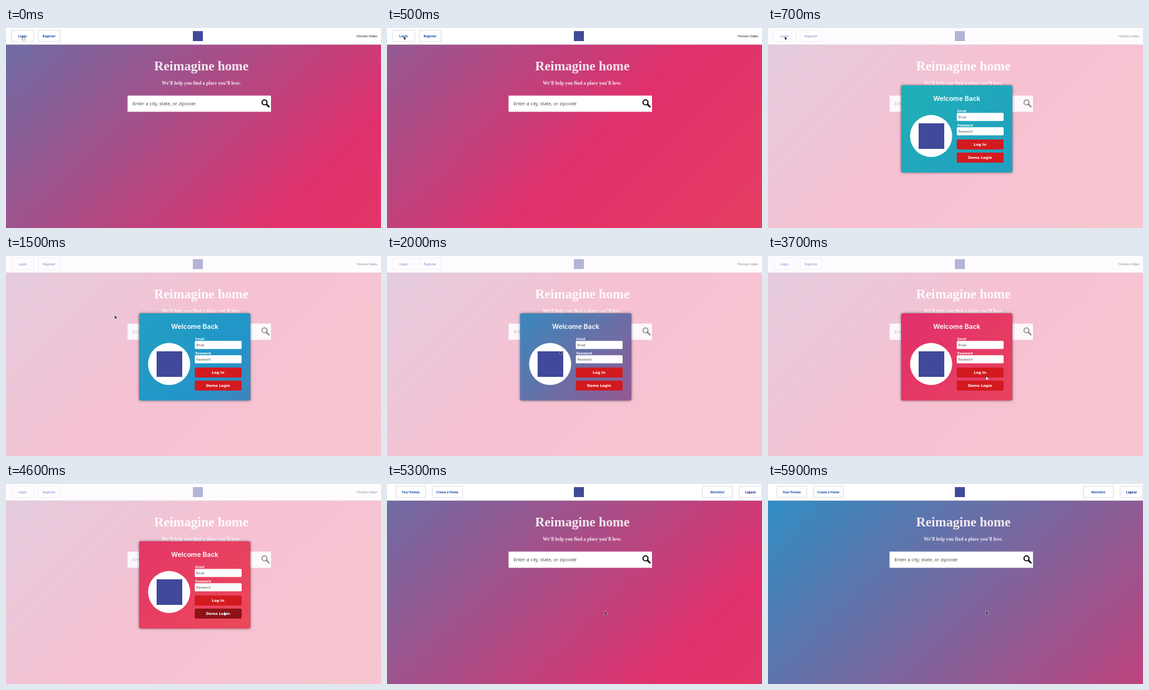
An HTML page with a canvas for the animation above (6000 ms loop, 600 px wide and 321 px high).

```html
<!DOCTYPE html>
<html lang="en">
<head>
<meta charset="utf-8">
<title>Home search</title>
<style>
html, body { margin: 0; width: 100%; height: 100%; overflow: hidden; background: #fff; }
canvas { display: block; width: 600px; height: 321px; }
</style>
</head>
<body>
<canvas id="stage"></canvas>
<script>
const W = 600, H = 321, LOOP = 6000, STEP = 100;
const OPEN = 700, HOVER = 3900, CLOSE = 5300;
const SANS = '"Open Sans", sans-serif';
const SERIF = '"Liberation Serif", serif';
const WIDE = '"DejaVu Sans", sans-serif';
const COLORS = ['#f0584f', '#e1306c', '#2394c9', '#1fb8b0'];
const LOGO = '#40499a';
const ARROW = new Path2D('M0 0V4.6L1.1 3.6L1.9 5.2L2.6 4.9L1.9 3.3H3.3Z');
const HAND = new Path2D('M0 0H.9L1.1 2L3.6 2.6V4L2.9 5.4H.4L-1.3 3.2L-.9 2.7L0 3.2Z');

const canvas = document.getElementById('stage');
const dpr = window.devicePixelRatio || 1;
canvas.width = W * dpr;
canvas.height = H * dpr;
const ctx = canvas.getContext('2d');
ctx.scale(dpr, dpr);

const clamp = x => Math.min(1, Math.max(0, x));
const mix = (a, b, f) => a + (b - a) * f;
const progress = (t, from, to) => clamp((t - from) / (to - from));

// CSS "ease": cubic-bezier(.25, .1, .25, 1), solved by bisection
function ease(x) {
  let lo = 0, hi = 1;
  for (let i = 0; i < 20; i++) {
    const u = (lo + hi) / 2, v = 1 - u;
    if (.75 * v * u + u ** 3 < x) lo = u; else hi = u;
  }
  const v = 1 - lo;
  return .3 * v * v * lo + 3 * v * lo * lo + lo ** 3;
}

function text(str, x, y, size, color, { font = SANS, weight = 400, align = 'left', alpha = 1 } = {}) {
  ctx.font = `${weight} ${size}px ${font}`;
  ctx.textAlign = align;
  ctx.fillStyle = color;
  ctx.globalAlpha = alpha;
  ctx.fillText(str, x, y);
  ctx.globalAlpha = 1;
}

function box(x, y, w, h, r, fill) {
  ctx.beginPath();
  ctx.roundRect(x, y, w, h, r);
  ctx.fillStyle = fill;
  ctx.fill();
}

// Diagonal window onto the four-colour blend, centred on position mid
function diagonal(x, y, w, h, mid, half) {
  const len = (w + h) / (4 * half), cx = x + w / 2, cy = y + h / 2;
  const a = mid * len, b = (mid - 1) * len;
  const g = ctx.createLinearGradient(cx + a, cy + a, cx + b, cy + b);
  COLORS.forEach((c, i) => g.addColorStop(i / 3, c));
  return g;
}

function navButton(label, x, w, size, dim, color = '#184bb0') {
  ctx.globalAlpha = dim ? .4 : 1;
  ctx.strokeStyle = '#dcdee8';
  ctx.lineWidth = 1;
  ctx.strokeRect(x + .5, 3.5, w, 18);
  text(label, x + w / 2 + .5, 14.5, size, color, { weight: 700, align: 'center', alpha: dim ? .42 : 1 });
}

function nav(dim, member) {
  ctx.fillStyle = dim ? '#fefcfe' : '#fff';
  ctx.fillRect(0, 0, W, 26);
  ctx.fillStyle = dim ? '#eee8ee' : '#cfcbd6';
  ctx.fillRect(0, 26, W, 1);
  if (member) {
    navButton('Your Homes', 13.5, 48, 4.8, dim);
    navButton('Create a Home', 72, 48, 4.8, dim);
    navButton('Watchlist', 504, 48, 4.8, dim);
    navButton('Logout', 563, 36, 5, dim, '#0b2a8c');
  } else {
    navButton('Login', 8, 36, 5.2, dim);
    navButton('Register', 51, 35, 5.1, dim);
    text('Homes Index', 594, 14.5, 5.4, '#111', { align: 'right', alpha: dim ? .5 : 1 });
  }
  ctx.globalAlpha = dim ? .4 : 1;
  box(299, 5, 16, 16, 0, LOGO);
  ctx.globalAlpha = 1;
}

function lens(alpha) {
  ctx.globalAlpha = alpha;
  ctx.strokeStyle = '#000';
  ctx.lineWidth = 1.8;
  ctx.lineCap = 'round';
  ctx.beginPath();
  ctx.arc(413.6, 119.4, 4, 0, 7);
  ctx.stroke();
  ctx.lineWidth = 2.6;
  ctx.beginPath();
  ctx.moveTo(417.2, 123);
  ctx.lineTo(420.6, 126.4);
  ctx.stroke();
  ctx.globalAlpha = 1;
}

// The page blend slides towards red, rests behind the dialog, then slides back
function pageMid(t) {
  return t < CLOSE
    ? mix(.41, .32, progress(t, 0, OPEN))
    : mix(.41, .52, progress(t, CLOSE, 5900));
}

function page(t, dim) {
  ctx.fillStyle = diagonal(0, 26, W, 295, pageMid(t), .125);
  ctx.fillRect(0, 0, W, H);
  if (dim) {
    ctx.fillStyle = 'rgba(255,255,255,.7)';
    ctx.fillRect(0, 0, W, H);
  }
  nav(dim, t >= CLOSE);
  const ink = dim ? '#fefafd' : '#f1e9f0';
  const heading = { font: SERIF, weight: 700, align: 'center' };
  text('Reimagine home', 312.5, 68, 21.2, ink, heading);
  text('We’ll help you find a place you’ll love.', 312.5, 91, 7.78, ink, heading);
  box(194.5, 108.5, 229.5, 26, 0, dim ? '#fdf8fb' : '#fff');
  text('Enter a city, state, or zipcode', 202.5, 124.2, 7.6, '#444', { alpha: dim ? .35 : 1 });
  lens(dim ? .4 : 1);
}

function field(label, y) {
  text(label, 303, y, 5.2, '#fff', { weight: 700 });
  box(302, y + 1.5, 75, 13, 1.5, '#fff');
  text(label, 304.5, y + 10, 5, '#444');
}

function button(label, y, fill) {
  box(302, y, 75, 16, 2, fill);
  text(label, 339.3, y + 10.2, 5.75, '#fff', { font: WIDE, weight: 700, align: 'center' });
}

function modal(t) {
  const mid = mix(.85, .18, ease(progress(t, 600, 5800)));
  ctx.save();
  ctx.shadowColor = 'rgba(0,0,0,.5)';
  ctx.shadowBlur = 4 * dpr;
  box(213, 92, 178, 140, 3, diagonal(213, 92, 178, 140, mid, .08));
  ctx.restore();
  text('Welcome Back', 302, 116.5, 10.6, '#fff', { font: 'Inter, sans-serif', weight: 600, align: 'center' });
  box(227.3, 139.6, 67.4, 67.4, 33.7, '#fff');
  box(241, 153, 41, 41, 0, LOGO);
  field('Email', 134.7);
  field('Password', 157.8);
  button('Log In', 179, '#d31a1f');
  button('Demo Login', 200, t >= HOVER ? '#8d1216' : '#d31a1f');
}

// From the nav to the first button, slowing down, then a short drop to the second
function cursor(t) {
  const f = 1 - (1 - progress(t, 1000, 2900)) ** 2;
  const x = mix(27, 349, f);
  const y = mix(14, 193, f) + 12 * progress(t, HOVER - 200, HOVER);
  const hand = t < 500 || (t >= 2700 && t < CLOSE);
  const shape = hand ? HAND : ARROW;
  ctx.save();
  ctx.translate(x, y);
  ctx.lineWidth = .9;
  ctx.lineJoin = 'round';
  ctx.strokeStyle = hand ? '#111' : '#ddd';
  ctx.stroke(shape);
  ctx.fillStyle = hand ? '#fff' : '#111';
  ctx.fill(shape);
  ctx.restore();
}

function draw(t) {
  const dim = t >= OPEN && t < CLOSE;
  page(t, dim);
  if (dim) modal(t);
  cursor(t);
}

function frame() {
  const now = performance.now() % LOOP;
  draw(Math.floor(now / STEP) * STEP);
  requestAnimationFrame(frame);
}
frame();
</script>
</body>
</html>
```
